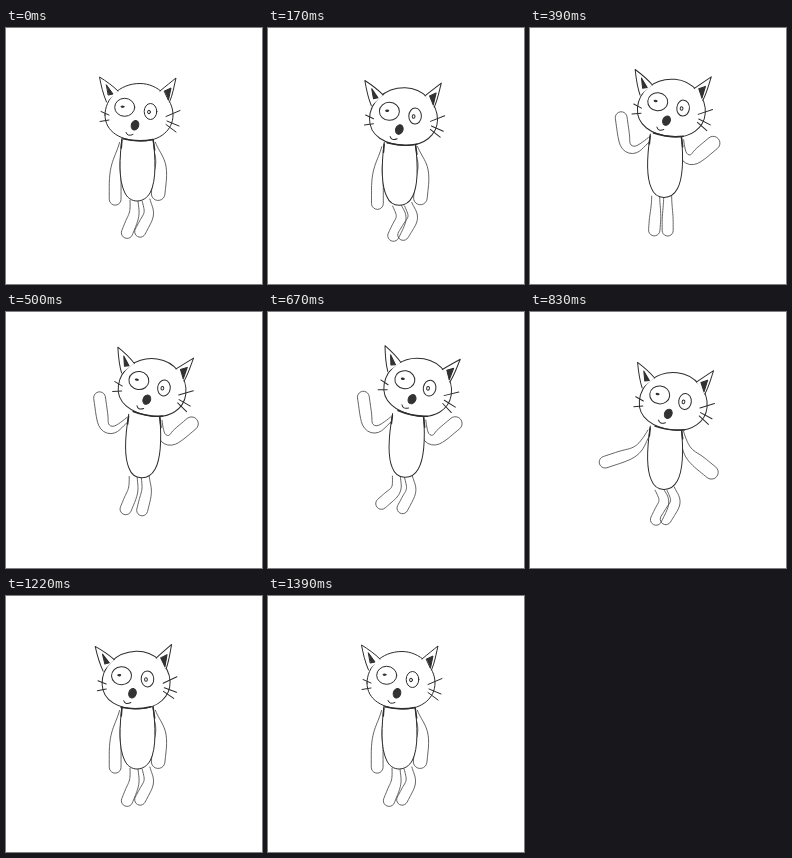
Animation of 256 by 256 pixels, one loop 1.45 s. Source, as an HTML page:

```html
<!DOCTYPE html>
<html lang="en">
<head>
<meta charset="utf-8">
<title>Dancing cat doodle</title>
<style>
  html, body { margin: 0; width: 100%; height: 100%; overflow: hidden; background: #fff; }
  svg { display: block; width: 100vw; height: 100vh; }
  path, ellipse { fill: none; stroke: #2c2c2c; stroke-width: 1; stroke-linecap: round; stroke-linejoin: round; }
  .limb { stroke: #484848; stroke-width: .85; }
  .paper { fill: #fff; }
  .ink { fill: #333; }
  .bold { stroke-width: 1.5; }
</style>
</head>
<body>
<svg viewBox="0 0 256 256">
  <path class="limb" id="legL"/>
  <path class="limb" id="legR"/>
  <path class="limb" id="armL"/>
  <path class="limb" id="armR"/>
  <g id="body">
    <path class="paper" d="M-15.5-2C-18 18-19 40-13 52C-8 64 7 64 13 52C19 40 18 18 15.5-2"/>
    <path class="bold" d="M-15.6 0L-16.2 8M15.5-1L17.2 10"/>
  </g>
  <g id="head">
    <path class="paper" d="M99 87C99 71 113 55.5 134 55.5C152 55.5 167 71 167 87C167 102 154 113 136 113C115 113 99 104 99 87Z"/>
    <path class="paper" d="M100.5 74C97 66 95 57 93.5 49C100 53 107 58 112 63"/>
    <path class="paper" d="M154 63C160 58 165 54 170 50C168 58 167 66 163.5 74"/>
    <path class="ink" d="M100.5 57L107 66L102.5 67Z"/>
    <path class="ink" d="M158.5 63L165 60L162.5 72Z"/>
    <path class="bold" d="M117 110.8Q132 114.5 147 111.5"/>
    <ellipse cx="118.7" cy="79.3" rx="10" ry="9"/>
    <ellipse cx="144.5" cy="83.5" rx="6.3" ry="8"/>
    <ellipse class="ink" cx="116.5" cy="78.7" rx="1.5" ry=".7"/>
    <ellipse cx="143" cy="84" rx="1.4" ry="1.8"/>
    <ellipse class="ink" cx="129" cy="97.3" rx="3.7" ry="4.8" transform="rotate(20 129 97.3)"/>
    <path d="M120 104.5Q121.5 109 127 106.5"/>
    <path d="M95 83.5L103 87M94 93.5L103 92M160 88.5L174 82.5M161 93L173 98M160 96.5L170 104"/>
  </g>
</svg>
<script>
const LOOP = 1450, RATE = 18, STEPS = 26;

const $ = id => document.getElementById(id);
const rad = deg => deg * Math.PI / 180;
const mix = (a, b, u) => a + (b - a) * u;
const ramp = (t, from, to) => {
  const u = Math.min(1, Math.max(0, (t - from) / (to - from)));
  return u * u * (3 - 2 * u);
};
// Rises from a to b, holds until c, falls until d
const hold = (t, a, b, c, d) => ramp(t, a, b) - ramp(t, c, d);
const pulse = (t, a, b, c) => hold(t, a, b, b, c);

// Outline of a bending, round-ended limb; angles are measured from straight down
function limb([x, y], side, len, upper, lower, w0, w1) {
  const N = 22, CAP = 10, right = [], left = [], cap = [];
  const at = (px, py) => px.toFixed(2) + ' ' + py.toFixed(2);
  let dx, dy, w;
  for (let i = 0; i <= N; i++) {
    const s = i / N, a = rad(mix(upper, lower, ramp(s, .2, .65)));
    dx = side * Math.sin(a);
    dy = Math.cos(a);
    w = mix(w0, w1, ramp(s, 0, .75));
    if (i) { x += dx * len / N; y += dy * len / N; }
    right.push(at(x + dy * w, y - dx * w));
    left.unshift(at(x - dy * w, y + dx * w));
  }
  for (let i = 1; i < CAP; i++) {
    const c = w * Math.cos(i * Math.PI / CAP), s = w * Math.sin(i * Math.PI / CAP);
    cap.push(at(x + dy * c + dx * s, y - dx * c + dy * s));
  }
  return 'M' + [...right, ...cap, ...left].join('L');
}

function draw(t) {
  // Dance moves, each from 0 to 1
  const crouch = pulse(t, 0, 3.5, 7) + pulse(t, 12, 15, 18);
  const jump = pulse(t, 4, 11, 15);
  const swing = pulse(t, 2, 12, 18);
  const raise = hold(t, 3, 7, 12.5, 17);
  const kick = pulse(t, 7, 12, 15);
  const lean = hold(t, 14, 19, 22, 25);
  const curve = 1 - pulse(t, 3.5, 7, 11) - pulse(t, 15, 18, 22);

  const hx = 129 + 15 * swing + 2 * crouch - 2.5 * lean;
  const hy = 97.5 + 4.5 * crouch - 12 * jump;
  const turn = 9.5 * swing + crouch - 2.2 * lean;
  $('head').setAttribute('transform', `translate(${hx} ${hy}) rotate(${turn}) translate(-129 -97.5)`);

  const bx = 131.5 + 8.5 * swing, by = 112 + 4.5 * crouch - 9 * jump, tilt = 3 * swing;
  $('body').setAttribute('transform', `translate(${bx} ${by}) rotate(${tilt})`);

  const cos = Math.cos(rad(tilt)), sin = Math.sin(rad(tilt));
  const joint = (x, y) => [bx + x * cos - y * sin, by + x * sin + y * cos];
  const hip = x => joint(x - 5 * raise, 60);
  const set = (id, ...shape) => $(id).setAttribute('d', limb(...shape));
  set('armL', joint(-16, 3), -1, 57, mix(16, 50, raise), mix(0, 172, raise), 2, 5.9);
  set('armR', joint(16, 3), 1, 52, mix(22, 5, raise), mix(-6, 130, raise), 2, 6.8);
  set('legL', hip(-3.5), 1, 34, 3 * curve + 25 * crouch, -4 - 18 * curve - 4 * crouch - 27 * kick, 4, 5.7);
  set('legR', hip(8.5), 1, 34, 16 * curve + 10 * crouch, -28 * curve - 4 * crouch, 4, 5.5);
}

const begin = performance.now();
let shown = -1;
function tick() {
  // Step changes fall on whole hundredths of a second
  const t = Math.floor((performance.now() - begin) % LOOP / 10) * 10 + 5;
  const step = Math.min(STEPS - 1, Math.floor(t * RATE / 1000));
  if (step !== shown) draw(shown = step);
  requestAnimationFrame(tick);
}
tick();
</script>
</body>
</html>
```
